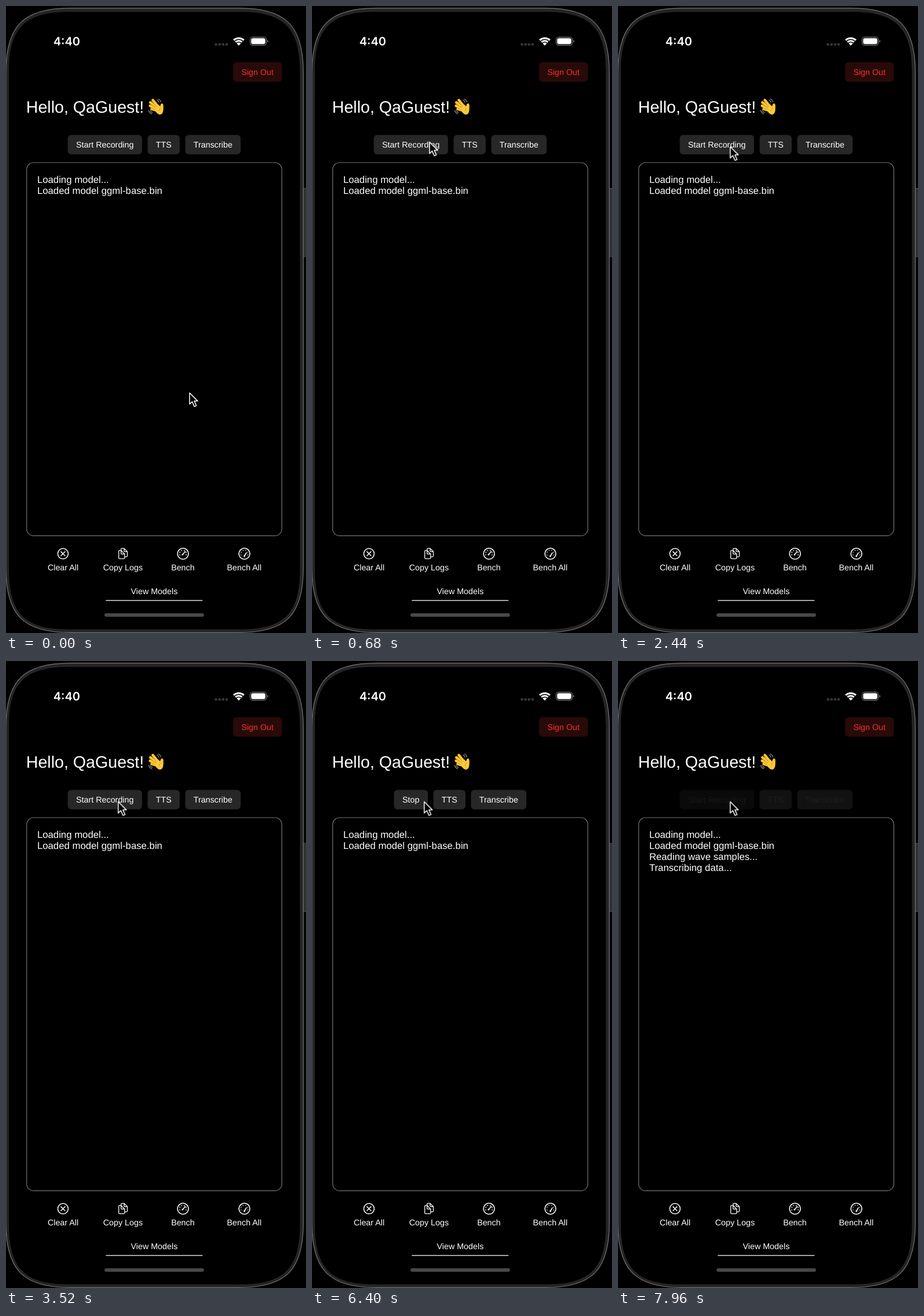
An HTML page for the animation above (8000 ms loop, 518 px wide and 1081 px high).

```html
<!DOCTYPE html>
<html lang="en">
<head>
<meta charset="utf-8">
<title>Voice transcription app</title>
<style>
  html, body { margin: 0; width: 100%; height: 100%; overflow: hidden; background: #000; }
  svg { display: block; width: 100vw; height: 100vh; }
  text { font-family: "Liberation Sans", Arial, sans-serif; font-size: 14.3px; fill: #fff; text-rendering: geometricPrecision; }
  .mid { text-anchor: middle; }
  .log { font-size: 16.75px; }
  .line { fill: none; stroke: #fff; stroke-width: 1.5; stroke-linecap: round; stroke-linejoin: round; }
</style>
</head>
<body>
<svg viewBox="0 0 518 1081">
  <rect width="518" height="1081"/>

  <!-- phone body -->
  <rect x="511" y="314.5" width="9" height="117.5" fill="#303030" stroke="#555"/>
  <g id="body"></g>

  <!-- status bar -->
  <text class="mid" x="104.8" y="68" style="font: 600 20px Inter, sans-serif">4:40</text>
  <g fill="#383838">
    <circle cx="362.6" cy="66.2" r="2.3"/><circle cx="368.7" cy="66.2" r="2.3"/>
    <circle cx="374.8" cy="66.2" r="2.3"/><circle cx="380.9" cy="66.2" r="2.3"/>
  </g>
  <g fill="none" stroke="#fff" stroke-width="3">
    <path d="M393 58.9a13 13 0 0 1 17.8 0"/>
    <path d="M396.2 62.2a8.5 8.5 0 0 1 11.400 0"/>
    <path d="M401.9 68.200l-3.600-3.700a5.200 5.200 0 0 1 7.200 0z" fill="#fff" stroke="none"/>
  </g>
  <rect x="421.5" y="53.6" width="28" height="14" rx="4.6" fill="none" stroke="#777" stroke-width="1.2"/>
  <rect x="423.3" y="55.4" width="24.4" height="10.4" rx="3" fill="#fff"/>
  <path d="M451.2 58.4q1.8.8 1.8 2.3t-1.8 2.3z" fill="#777"/>

  <!-- header -->
  <rect x="392" y="97" width="84.6" height="33.4" rx="6" fill="#280a08"/>
  <text class="mid" x="434.2" y="119" style="fill:#f5302b">Sign Out</text>
  <text x="34.8" y="184.3" style="font-size:28.6px">Hello, QaGuest!</text>
  <g id="wave" fill="none" stroke-linecap="round" stroke-linejoin="round">
    <path d="M257.500 179.500L262.500 170.500L266.500 174.500Q267.500 169 269.300 168.800Q271.500 169 271 174.500Q271.500 186.500 265.500 186.500Q261.500 186 257.500 179.500Z" fill="#fcc937" stroke="#fcc937" stroke-width="1.400"/>
    <path d="M267 175.500q-3 2.500-2.400 5.500" stroke="#d99b22"/>
    <path d="M261 162q2.400 1.300 3.200 4M263.300 160.300q3.200 1.800 4.200 5M246.300 180q1.200 4 5 5.800M249.300 180q1 2.500 3.600 4" stroke="#85898c" stroke-width="1.300"/>
  </g>

  <g id="idle"></g>
  <g id="recording"></g>
  <g id="busy"></g>

  <!-- log panel -->
  <rect x="35.7" y="270" width="440.6" height="643.4" rx="12" fill="none" stroke="#747474" stroke-width="1.2"/>
  <text class="log" x="53.9" y="304.7">Loading model...</text>
  <text class="log" x="53.9" y="323.9">Loaded model ggml-base.bin</text>
  <text class="log" x="53.9" y="343.1" id="reading">Reading wave samples...</text>
  <text class="log" x="53.9" y="362.3" id="transcribing">Transcribing data...</text>

  <!-- footer -->
  <g class="line">
    <circle cx="98.4" cy="944.3" r="9"/>
    <path d="M95 940.9l6.8 6.8m0-6.8l-6.8 6.8"/>
    <path d="M198.7 938.7h-2.5q-1.5 0-1.5 1.5v11.2q0 1.5 1.5 1.5h7.2q1.5 0 1.5-1.5v-1.8M198.7 938.7l6.2 6.2M198.7 938.7v5q0 1.2 1.2 1.2h5v4.7M198.7 938.7v-2q0-1.5 1.5-1.5h3.8l5.5 5.5v7.4q0 1.5-1.5 1.5h-3.1M204 935.2v4.3q0 1.2 1.2 1.2h4.3" stroke-width="1.3"/>
  </g>
  <g id="gauges"></g>
  <text class="mid" x="98.5" y="973">Clear All</text>
  <text class="mid" x="201.9" y="973">Copy Logs</text>
  <text class="mid" x="305.4" y="973">Bench</text>
  <text class="mid" x="411.4" y="973">Bench All</text>
  <text class="mid" x="255.9" y="1014">View Models</text>
  <rect x="172.3" y="1024.2" width="167" height="1.4" fill="#e8e8e8"/>
  <rect x="170" y="1047" width="171.8" height="6" rx="3" fill="#484848"/>

  <g id="pointer">
    <path d="M0 0V19.4L4.5 15.3L8.2 23.6L11.7 22.1L8.1 14.1H14Z" fill="#000" stroke="#fff" stroke-width="1.5" stroke-linejoin="round"/>
  </g>
</svg>
<script>
const LOOP = 8000;
const RECORD_AT = 4200, PRESS_AT = 7720, STOP_AT = 7880, TRANSCRIBE_AT = 7960;
const byId = id => document.getElementById(id);

function add(parent, tag, attrs, text = '') {
  const el = document.createElementNS('http://www.w3.org/2000/svg', tag);
  for (const key in attrs) el.setAttribute(key, attrs[key]);
  el.textContent = text;
  return parent.appendChild(el);
}

// Rectangle whose corners ease gradually into the straight sides.
function smoothRect(x, y, w, h, radius) {
  const e = radius * 1.3, c = e - radius * .348;
  return `M${x} ${y + e}c0 ${-c} ${e - c} ${-e} ${e} ${-e}h${w - 2 * e}` +
    `c${c} 0 ${e} ${e - c} ${e} ${e}v${h - 2 * e}` +
    `c0 ${c} ${c - e} ${e} ${-e} ${e}h${2 * e - w}` +
    `c${-c} 0 ${-e} ${c - e} ${-e} ${-e}z`;
}

function button(parent, label, x, width, fill = '#272727', color = '#fff') {
  const g = add(parent, 'g', {});
  add(g, 'rect', { x, y: 222.3, width, height: 33.4, rx: 6, fill });
  add(g, 'text', { class: 'mid', x: x + width / 2, y: 244, style: `fill:${color}` }, label);
  return g;
}

function gauge(x, tickStart, needle, hubX, hubY) {
  const g = add(byId('gauges'), 'g', { class: 'line', transform: `translate(${x} 944.3)` });
  add(g, 'circle', { r: 9.5, 'stroke-width': 1.6 });
  for (let deg = -200; deg <= 20; deg += 44) {
    const a = deg * Math.PI / 180, c = Math.cos(a), s = Math.sin(a);
    add(g, 'path', { d: `M${c * tickStart} ${s * tickStart}L${c * 6.4} ${s * 6.4}`, 'stroke-width': 1.3 });
  }
  add(g, 'path', { d: `M${hubX} ${hubY}L${needle}`, 'stroke-width': 1.6 });
  add(g, 'circle', { cx: hubX, cy: hubY, r: 1.4, fill: '#fff', stroke: 'none' });
}

function finger(x, y, tipX, tipY) {
  const d = `M${x} ${y}L${tipX} ${tipY}`, wave = byId('wave');
  const palm = wave.querySelector('path[fill]');
  for (const [stroke, width] of [['#b07d17', 4.9], ['#fcc937', 3.7]]) {
    wave.insertBefore(add(wave, 'path', { d, stroke, 'stroke-width': width }), palm);
  }
}

function play(el, steps) {
  const frames = steps.map(([time, props]) => ({ offset: time / LOOP, ...props }));
  el.animate(frames, { duration: LOOP, iterations: Infinity });
}

function showBetween(el, from, to) {
  const step = (time, opacity) => [time, { opacity, easing: 'steps(1, end)' }];
  const after = to < LOOP ? 0 : 1;
  play(el, [step(0, from ? 0 : 1), step(from, 1), step(to, after), step(LOOP, after)]);
}

add(byId('body'), 'path', { d: smoothRect(-.2, 3.7, 513.6, 1076.6, 86), fill: '#252525', stroke: '#747474', 'stroke-width': 1.2 });
add(byId('body'), 'path', { d: smoothRect(5, 10.3, 502.5, 1064.5, 79) });

finger(260, 180, 251.5, 177.5);
finger(260, 178, 248.8, 172);
finger(261, 175, 249.3, 166.3);
finger(263, 174, 253.5, 162.3);

const idle = byId('idle'), recording = byId('recording'), busy = byId('busy');
button(idle, 'Start Recording', 106.6, 128.3);
button(idle, 'TTS', 244.5, 55.4);
button(idle, 'Transcribe', 309.5, 95.7);

const stop = button(recording, 'Stop', 141.5, 58.5);
button(recording, 'TTS', 209.5, 55.5);
button(recording, 'Transcribe', 274.5, 95.7);

button(busy, 'Start Recording', 106.6, 128.3, '#0a0a0a', '#181818');
button(busy, 'TTS', 244.5, 55.4, '#121212', '#1f1f1f');
button(busy, 'Transcribe', 309.5, 95.7, '#121212', '#1f1f1f');

gauge(305.6, 5.4, '3.8 -3.8', -.8, 1.6);
gauge(411.6, 6, '3.4 -1.6', 0, 4.2);

showBetween(idle, 0, RECORD_AT);
showBetween(recording, RECORD_AT, STOP_AT);
showBetween(busy, STOP_AT, LOOP);
showBetween(byId('reading'), STOP_AT, LOOP);
showBetween(byId('transcribing'), TRANSCRIBE_AT, LOOP);
play(stop, [[0, { opacity: 1 }], [PRESS_AT, { opacity: 1 }], [STOP_AT, { opacity: .3 }], [LOOP, { opacity: .3 }]]);

const at = (time, x, y, easing = 'linear') => [time, { transform: `translate(${x}px, ${y}px)`, easing }];
play(byId('pointer'), [
  at(0, 317, 667, 'ease-in-out'),
  at(400, 246, 330),
  at(520, 246, 330, 'ease-in-out'),
  at(680, 203, 234.6, 'ease-out'),
  at(1080, 193.8, 242.6),
  at(LOOP, 193.8, 242.6),
]);
</script>
</body>
</html>
```
